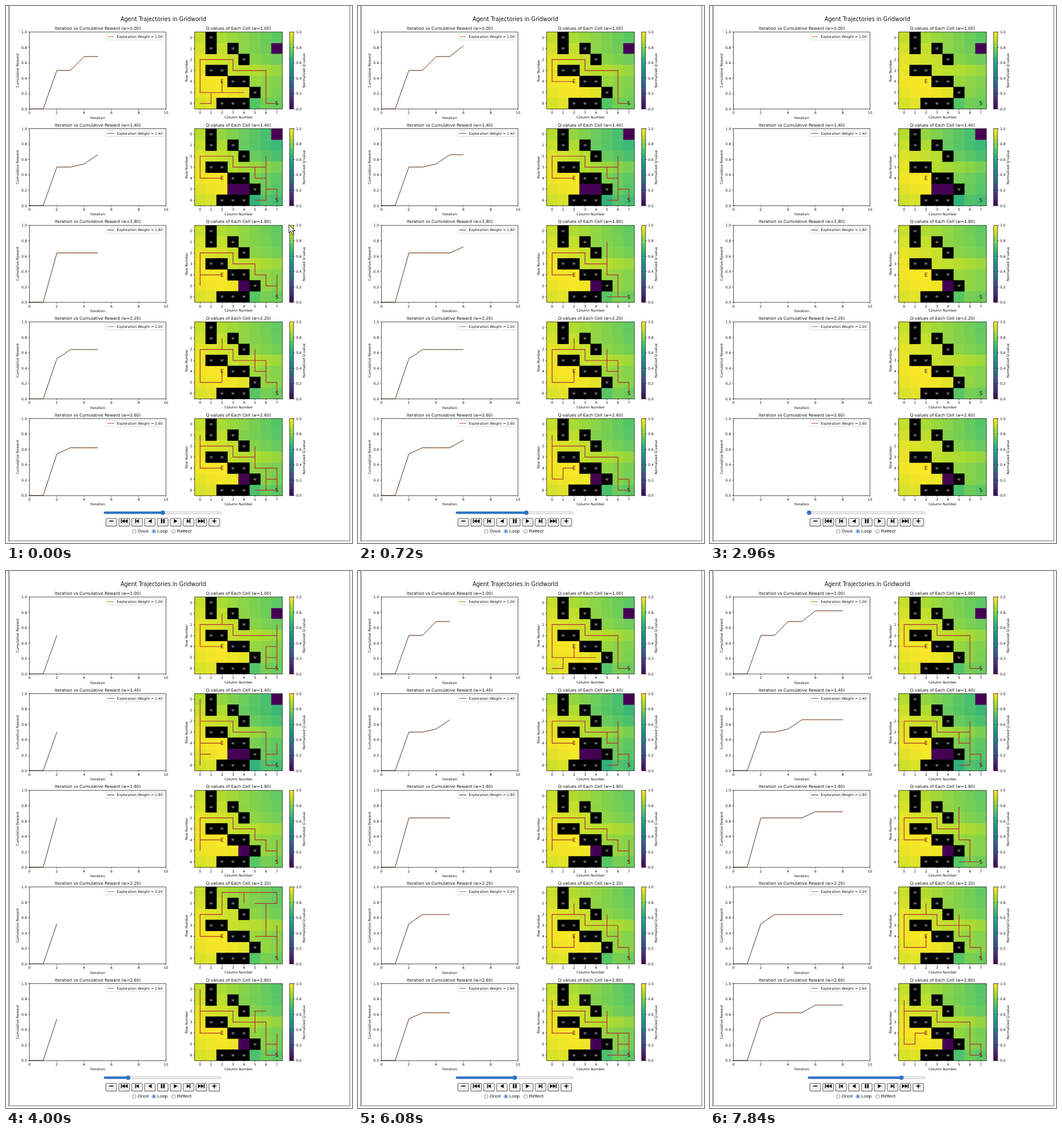
Animation of 598x926 px, one loop 8000 ms. Source, as an HTML page:

```html
<!DOCTYPE html>
<html lang="en">
<head>
<meta charset="utf-8">
<title>Agent Trajectories in Gridworld</title>
<style>
  html, body { margin: 0; width: 100%; height: 100%; overflow: hidden; background: #fff; }
  svg { display: block; width: 598px; height: 926px; font: 6px "DejaVu Sans", sans-serif; fill: #111; }
  .axis { fill: none; stroke: #1a1a1a; stroke-width: .75; }
  .curve { fill: none; stroke-width: .8; stroke-linejoin: round; }
  .path { fill: none; stroke: #b02c34; stroke-width: 1.2; stroke-linecap: square; }
  .control { font: 8px "Liberation Sans", Arial, sans-serif; }
</style>
</head>
<body>
<svg id="stage" viewBox="0 0 598 926"></svg>
<script>
const ROWS = 7, COLS = 8;
const PITCH = 166.65, TOP = 44.9, HEIGHT = 132.8, CELL = HEIGHT / ROWS;
const PLOT = { x: 40.5, w: 236 }, GRID = { x: 326, w: CELL * COLS };

const LOOP = 8000, STEP = 555, FIRST_STEP = 110, ITERATIONS = 11;
const REFRESHES = [0, 160, 960, 2000, 2960, 3840, 4000, 5200, 6080, 6960, 7840];

// Cells are named by row and column.
const START = '67', EXIT = '42';
const WALLS = '01 11 13 24 31 32 43 44 55 62 63 64'.split(' ');
const VIRIDIS = ['#440154', '#472d7b', '#3b528b', '#2c728e', '#21918c',
                 '#28ae80', '#5ec962', '#addc30', '#fde725'];

// rewards and routes are keyed by the iteration at which they take over.
// A route names waypoints; the agent takes the shortest way between them.
const RUNS = [
  { weight: '1.00', color: '#e0733a', falloff: 1, unvisited: '17',
    rewards: { 0: 0, 2: .5, 4: .68, 6: .82 },
    routes: { 1: '67 66 46 47 67 57 56 57 27 37 12 42',
              4: '67 66 20 54 61 60 61 52 42',
              6: '67 66 42' } },
  { weight: '1.40', color: '#77605f', falloff: 1.3, unvisited: '07 53 54',
    rewards: { 0: 0, 2: .5, 4: .54, 5: .66 },
    routes: { 1: '67 66 56 57 47 57 56 00 60 50 51 50 42',
              5: '67 57 56 66 65 66 26 46 45 35 36 42' } },
  { weight: '1.80', color: '#3c3634', falloff: .95, unvisited: '54',
    rewards: { 0: 0, 2: .64, 6: .72 },
    routes: { 1: '67 47 57 56 45 50 42',
              6: '67 65 66 46 45 15 35 42' } },
  { weight: '2.20', color: '#c2745c', falloff: .95, unvisited: '',
    rewards: { 0: 0, 2: .52, 3: .64 },
    routes: { 1: '67 37 47 45 46 15 17 07 14 42',
              3: '67 57 56 36 46 45 25 35 36 12 50 52 42' } },
  { weight: '2.60', color: '#c06a4c', falloff: 1.05, unvisited: '54',
    rewards: { 0: 0, 2: .54, 3: .62, 6: .72, 9: .74 },
    routes: { 1: '67 47 57 56 66 67 66 36 45 26 00 42',
              3: '67 65 66 46 56 57 67 47 45 25 10 42',
              6: '67 57 56 66 67 66 10 50 51 42',
              9: '67 42' } },
];

const range = n => [...Array(n).keys()];
const latest = (steps, k) => steps[Object.keys(steps).filter(n => n <= k).pop()];
const rect = (x, y, w, h, attrs = '') => `<rect x="${x}" y="${y}" width="${w}" height="${h}" ${attrs}/>`;
const text = (x, y, s, anchor = 'middle', attrs = '') =>
  `<text x="${x}" y="${y}" text-anchor="${anchor}" ${attrs}>${s}</text>`;
const sideText = (x, y, s) => text(0, 0, s, 'middle', `transform="translate(${x} ${y}) rotate(-90)"`);
const line = (d, cls = 'axis', attrs = '') => `<path class="${cls}" d="${d}" ${attrs}/>`;
const cellX = c => GRID.x + CELL * (+c + .5);
const cellY = r => TOP + CELL * (+r + .5);

function viridis(v) {
  const i = Math.min(7, Math.floor(v * 8)), f = v * 8 - i;
  const channel = (hex, k) => parseInt(hex.substr(1 + 2 * k, 2), 16);
  return `rgb(${[0, 1, 2].map(k =>
    Math.round(channel(VIRIDIS[i], k) * (1 - f) + channel(VIRIDIS[i + 1], k) * f))})`;
}

// Open neighbours in order of preference: up, left, down, right.
function neighbours([row, col]) {
  const r = +row, c = +col;
  return [[r - 1, c], [r, c - 1], [r + 1, c], [r, c + 1]]
    .filter(([y, x]) => y >= 0 && y < ROWS && x >= 0 && x < COLS)
    .map(([y, x]) => `${y}${x}`).filter(cell => !WALLS.includes(cell));
}

function distancesTo(goal) {
  const dist = { [goal]: 0 }, queue = [goal];
  for (const cell of queue) for (const next of neighbours(cell)) {
    if (next in dist) continue;
    dist[next] = dist[cell] + 1;
    queue.push(next);
  }
  return dist;
}

function walk(route) {
  const [first, ...goals] = route.split(' '), cells = [first];
  let cell = first;
  for (const goal of goals) {
    const dist = distancesTo(goal);
    while (cell !== goal) cells.push(cell = neighbours(cell).find(n => dist[n] < dist[cell]));
  }
  return cells;
}

const toExit = distancesTo(EXIT), toStart = distancesTo(START);

// Values fall with the distance to the exit, faster away from the direct way.
function qValue(run, cell) {
  if (run.unvisited.includes(cell)) return 0;
  const d = toExit[cell], detour = d + toStart[cell] - toExit[START];
  const wobble = Math.sin(cell * 12.9 + run.weight * 78.2) * .0012 * d;
  return 1 - run.falloff * d * (.008 + .0005 * d + .001 * detour) + wobble;
}

// Ticks and labels 0.0 to 1.0 on the left (dir -1) or right (dir 1) of x.
const unitTicks = (x, dir) => range(6).map(i => {
  const y = TOP + HEIGHT * (1 - i / 5);
  return line(`M${x} ${y}h${2 * dir}`) +
    text(x + 4.2 * dir, y + 2.2, (i / 5).toFixed(1), dir < 0 ? 'end' : 'start');
}).join('');

const bottomTick = (x, label) =>
  line(`M${x} ${TOP + HEIGHT}v2`) + text(x, TOP + HEIGHT + 8.6, label);

function rewardPlot(run) {
  const mid = PLOT.x + PLOT.w / 2;
  return text(mid, 41.2, `Iteration vs Cumulative Reward (w=${run.weight})`, 'middle', 'font-size="7.2"') +
    line('', 'curve', 'stroke="#d2601f"') +
    line('', 'curve', 'stroke="#4b4644" transform="translate(.35 -.35)"') +
    rect(PLOT.x, TOP, PLOT.w, HEIGHT, 'class="axis"') +
    unitTicks(PLOT.x, -1) +
    range(6).map(i => bottomTick(PLOT.x + PLOT.w * i / 5, 2 * i)).join('') +
    text(mid, 194.6, 'Iteration') + sideText(22.2, 111.5, 'Cumulative Reward') +
    rect(172.5, 47.8, 101, 10.8, 'rx="1.2" fill="#fff" stroke="#ccc" stroke-width=".7"') +
    rect(175, 52.4, 12, 1.1, `fill="${run.color}"`) +
    text(191.6, 55.2, `Exploration Weight = ${run.weight}`, 'start');
}

function heatmap(run) {
  const square = ([r, c], fill) => rect(GRID.x + CELL * c, TOP + CELL * r, CELL, CELL,
    `fill="${fill}" stroke="${fill}" stroke-width=".5"`);
  const label = ([r, c], s, size, fill) =>
    text(cellX(c), cellY(r) + size * .36, s, 'middle', `font-size="${size}" fill="${fill}"`);
  const mid = GRID.x + GRID.w / 2;
  return text(mid, 41.2, `Q-values of Each Cell (w=${run.weight})`, 'middle', 'font-size="7.2"') +
    Object.keys(toExit).map(cell => square(cell, viridis(qValue(run, cell)))).join('') +
    WALLS.map(cell => square(cell, '#000') + label(cell, 'W', 5.2, '#eee')).join('') +
    label(EXIT, 'E', 8.4, '#111') + label(START, 'S', 8.4, '#111') +
    line('', 'path') + rect(GRID.x, TOP, GRID.w, HEIGHT, 'class="axis"') +
    range(ROWS).map(r => line(`M${GRID.x} ${cellY(r)}h-2`) +
      text(GRID.x - 4.2, cellY(r) + 2.2, r, 'end')).join('') +
    range(COLS).map(c => bottomTick(cellX(c), c)).join('') +
    text(mid, 194.2, 'Column Number') + sideText(314.4, 111.5, 'Row Number') +
    rect(490, TOP, 7, HEIGHT, 'fill="url(#bar)"') + rect(490, TOP, 7, HEIGHT, 'class="axis"') +
    unitTicks(497, 1) + sideText(517.4, 111.5, 'Normalized Q-value');
}

function controls() {
  const bar = x => `M${x} -3.5h1.5v7h-1.5z`;
  const arrow = (x, w) => `M${x} -3.5l${w} 3.5 ${-w} 3.5z`;
  const icons = [
    'M-3.5 -.8h7v1.6h-7z',
    bar(-5.5) + arrow(1, -5) + arrow(6, -5),
    bar(-3) + arrow(3, -4.5),
    arrow(3, -6),
    'M-3.2 -3.5h2.4v7h-2.4zM.8 -3.5h2.4v7h-2.4z',
    arrow(-3, 6),
    arrow(-3, 4.5) + bar(1.5),
    arrow(-6, 5) + arrow(-1, 5) + bar(4),
    'M-3.5 -.8h7v1.6h-7zM-.8 -3.5h1.6v7h-1.6z',
  ];
  const buttons = icons.map((d, i) => `<g transform="translate(${182 + 22.25 * i} 888.3)">` +
    rect(-9.3, -4.8, 18.6, 13.4, 'rx="2" fill="#efefef" stroke="#6f6f6f" stroke-width="1.1"') +
    `<path d="${d}" fill="#000"/></g>`).join('');
  const radios = ['Once', 'Loop', 'Reflect'].map((label, i) => {
    const x = 221.5 + 34 * i, on = label === 'Loop';
    return `<circle cx="${x}" cy="906" r="3.1" fill="#fff" stroke="${on ? '#2a72c8' : '#777'}" stroke-width=".8"/>` +
      (on ? `<circle cx="${x}" cy="906" r="1.8" fill="#2a72c8"/>` : '') +
      text(x + 6, 908.4, label, 'start', 'class="control"');
  }).join('');
  return rect(169, 872, 203.5, 3.6, 'rx="1.8" fill="#efefef" stroke="#b5b5b5" stroke-width=".7"') +
    rect(169, 871.8, 0, 4, 'id="fill" rx="2" fill="#2d74c4"') +
    '<circle id="thumb" cy="873.8" r="3.8" fill="#2d74c4"/>' + buttons + radios;
}

const stage = document.getElementById('stage');
stage.innerHTML =
  `<linearGradient id="bar" x1="0" y1="1" x2="0" y2="0">${VIRIDIS.map((color, i) =>
    `<stop offset="${i / 8}" stop-color="${color}"/>`).join('')}</linearGradient>` +
  `<g fill="#a0a5a9">${rect(3.6, 0, 2.8, 923)}${rect(593.4, 0, 1.8, 923)}${rect(3.6, 921.4, 591.6, 1.8)}</g>` +
  text(272, 25.6, 'Agent Trajectories in Gridworld', 'middle', 'font-size="9.6"') +
  RUNS.map((run, i) =>
    `<g class="run" transform="translate(0 ${PITCH * i})">${rewardPlot(run)}${heatmap(run)}</g>`).join('') +
  controls() +
  '<path id="cursor" d="M489 377v14.5l3.4-3.2 2.7 6.2 2.4-1.1-2.7-6h4.6z" fill="#fff" stroke="#000" stroke-width=".9"/>';

const groups = [...stage.querySelectorAll('.run')];
const polyline = points => points.length ? 'M' + points.join('L') : '';

function showIteration(k) {
  RUNS.forEach((run, i) => {
    const curve = polyline(range(k && k + 1).map(n =>
      `${PLOT.x + PLOT.w * n / 10} ${TOP + HEIGHT * (1 - latest(run.rewards, n))}`));
    const route = k ? walk(latest(run.routes, k)) : [];
    groups[i].querySelectorAll('.curve').forEach(el => el.setAttribute('d', curve));
    groups[i].querySelector('.path').setAttribute('d',
      polyline(route.map(([r, c]) => `${cellX(c)} ${cellY(r)}`)));
  });
  const x = 171.2 + 19.95 * k;
  document.getElementById('thumb').setAttribute('cx', x);
  document.getElementById('fill').setAttribute('width', x - 169);
}

let shown = -1;
function tick() {
  const t = performance.now() % LOOP;
  const refresh = REFRESHES.filter(start => start <= t).pop();
  const k = (6 + Math.floor((refresh - FIRST_STEP) / STEP)) % ITERATIONS;
  if (k !== shown) showIteration(shown = k);
  document.getElementById('cursor').setAttribute('visibility', refresh ? 'hidden' : 'visible');
  requestAnimationFrame(tick);
}
tick();
</script>
</body>
</html>
```
